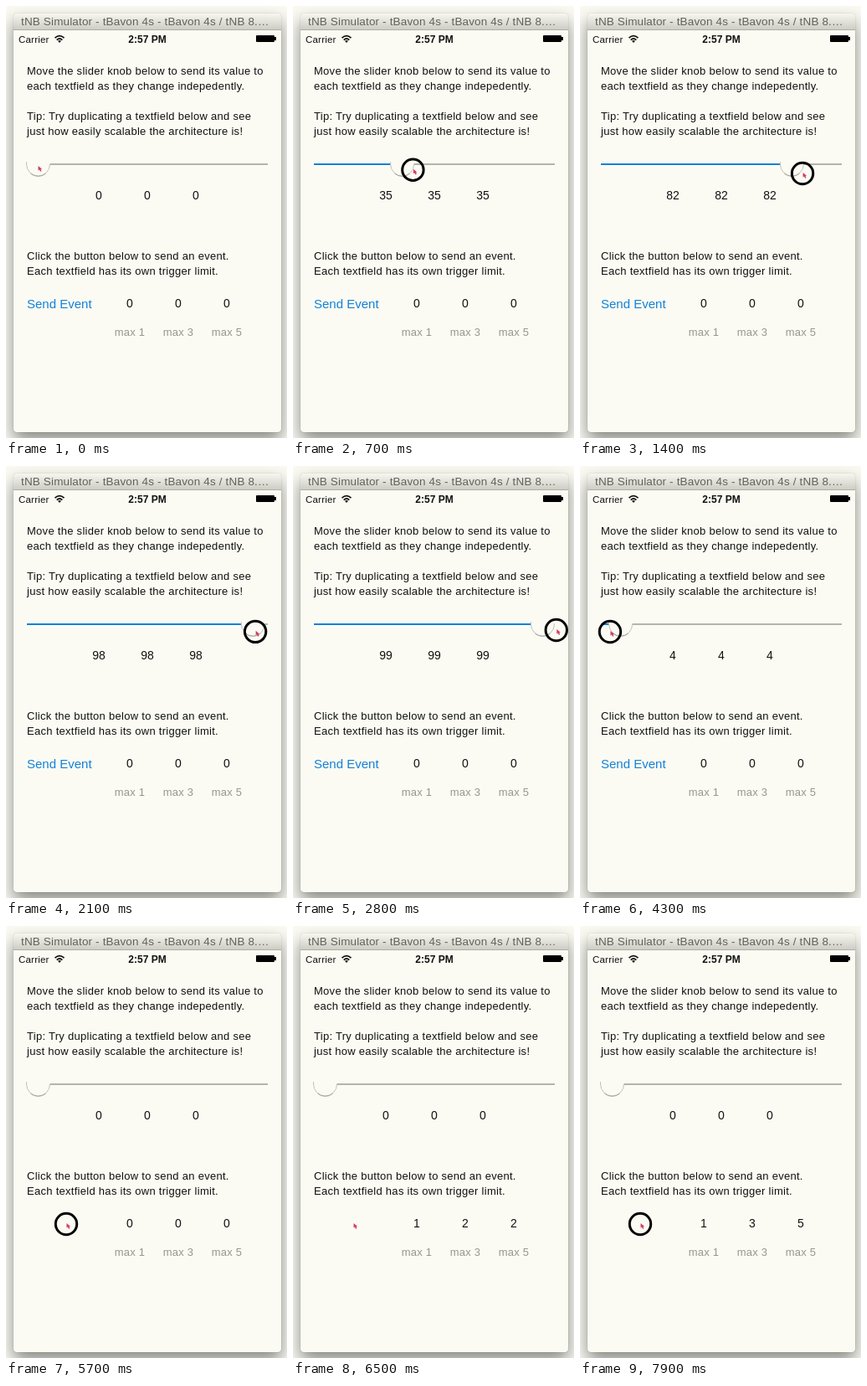
Recreate the animation shown at these times as an HTML page. Size 336 by 516 pixels, loop 8 s.

```html
<!DOCTYPE html>
<html lang="en">
<head>
<meta charset="utf-8">
<title>Slider and events</title>
<style>
  html, body { margin: 0; width: 100%; height: 100%; overflow: hidden; background: #fafaf3; }
  #stage { position: relative; width: 336px; height: 516px; overflow: hidden; }
  #window {
    position: absolute; left: 9px; top: 9px; width: 320px; height: 500px;
    border-radius: 4px; background: #fbfbf3;
    box-shadow: 0 10px 20px rgba(0, 0, 0, .45), 0 0 1px rgba(0, 0, 0, .4);
  }
  #bar {
    height: 19px; border-bottom: 1px solid #b0b0a9; border-radius: 4px 4px 0 0;
    background: linear-gradient(#f7f7f0, #cdcdc6);
  }
  svg { position: absolute; left: 0; top: 0; }
  text { font: 13px "Liberation Sans", Arial, sans-serif; fill: #111; white-space: pre; }
  .copy { letter-spacing: .28px; }
  .title { font-size: 13.5px; letter-spacing: .15px; fill: #62625d; }
  .status { font-size: 11.5px; letter-spacing: .2px; }
  .time { font-size: 12px; font-weight: bold; text-anchor: middle; }
  .num { font-size: 14px; text-anchor: middle; }
  .max { letter-spacing: .2px; text-anchor: middle; fill: #96968f; }
  #send { font-size: 15px; fill: #1280dc; }
</style>
</head>
<body>
<div id="stage">
  <div id="window"><div id="bar"></div></div>
  <svg id="ui" width="336" height="516">
    <text class="title" x="18" y="23">tNB Simulator - tBavon 4s - tBavon 4s / tNB 8.…</text>

    <text class="status" x="15" y="44">Carrier</text>
    <g fill="none" stroke="#111" stroke-width="1.7">
      <path d="M58.5 38.2Q64 33 69.5 38.2M60.7 40.6Q64 37.4 67.3 40.6"/>
      <path d="M62 41.8Q64 40 66 41.8L64 44Z" fill="#111" stroke="none"/>
    </g>
    <text class="time" x="169" y="44">2:57 PM</text>
    <rect x="299" y="35" width="22" height="8" rx="1"/>
    <rect x="321" y="37" width="2" height="4"/>

    <text class="copy" x="25" y="82">Move the slider knob below to send its value to</text>
    <text class="copy" x="25" y="100">each textfield as they change indepedently.</text>
    <text class="copy" x="25" y="136">Tip: Try duplicating a textfield below and see</text>
    <text class="copy" x="25" y="154">just how easily scalable the architecture is!</text>
    <text class="copy" x="25" y="303">Click the button below to send an event.</text>
    <text class="copy" x="25" y="321">Each textfield has its own trigger limit.</text>

    <rect x="25" y="188" width="288" height="2" fill="#b4b4ae"/>
    <rect id="fill" x="25" y="188" height="2" fill="#1280dc"/>
    <g id="knob">
      <circle r="14" fill="#fbfbf3"/>
      <path d="M-14 -3V0A14 14 0 0 0 14 0" fill="none" stroke="#c2c2bb"/>
      <path d="M-9 11.2A14.3 14.3 0 0 0 9 11.2" fill="none" stroke="#a4a49e"/>
    </g>

    <text id="send" x="25" y="361">Send Event</text>
    <g id="numbers"></g>

    <g id="pointer">
      <circle id="ring" r="12.7" fill="none" stroke="#000" stroke-width="3"/>
      <path d="M.5 -1V4.5L2 3.5L3 5.8L4.4 5.2L3.6 3L5 2.8Z" fill="#d23a68"/>
    </g>
  </svg>
</div>
<script>
const LOOP = 8000, LAG = 70, HOLD = 250;
const KNOB_MIN = 39, KNOB_MAX = 299, STEP = 2.62;
const LIMITS = [1, 3, 5];
const presses = [5600, 6200, 6630, 7050, 7470, 7880];
// pointer path: time, x, y
const path = [
  [0, 38, 192], [100, 38, 192], [1400, 266, 200], [1800, 288, 199], [2600, 315, 196],
  [2800, 315, 196], [3700, 150, 198], [4300, 36, 198], [4600, 18, 196],
  [4750, 18, 196], [5450, 72, 356], [LOOP, 72, 356]
];

const $ = id => document.getElementById(id);
const clamp = (v, lo, hi) => Math.min(hi, Math.max(lo, v));

function addText(cls, x, y, str) {
  const el = document.createElementNS("http://www.w3.org/2000/svg", "text");
  el.setAttribute("class", cls);
  el.setAttribute("x", x);
  el.setAttribute("y", y);
  el.textContent = str;
  $("numbers").append(el);
  return el;
}

const values = LIMITS.map((_, i) => addText("num", 111 + 58 * i, 231, 0));
const counts = LIMITS.map((_, i) => addText("num", 148 + 58 * i, 360, 0));
LIMITS.forEach((n, i) => addText("max", 148 + 58 * i, 394, "max " + n));

function pointerAt(t) {
  const i = Math.max(1, path.findIndex(p => p[0] >= t));
  const [t0, x0, y0] = path[i - 1], [t1, x1, y1] = path[i];
  const k = clamp((t - t0) / (t1 - t0), 0, 1);
  return [x0 + (x1 - x0) * k, y0 + (y1 - y0) * k];
}

function draw(t) {
  const dragging = t >= 100 && t < 4700;
  const [x, y] = pointerAt(t);
  const knob = clamp(pointerAt(Math.min(t, 4700) - LAG)[0], KNOB_MIN, KNOB_MAX);
  const value = Math.round((knob - KNOB_MIN) / STEP);
  $("knob").setAttribute("transform", `translate(${knob - .5} 189)`);
  $("fill").setAttribute("width", knob - KNOB_MIN);
  values.forEach(el => el.textContent = value);

  const last = presses.filter(p => p <= t).pop();
  const pressed = last !== undefined && t < last + HOLD;
  const clicks = presses.filter(p => p + HOLD <= t).length;
  counts.forEach((el, i) => el.textContent = Math.min(clicks, LIMITS[i]));
  // the label fades back in after each release
  $("send").style.opacity = last === undefined ? 1 : clamp((t - last - HOLD - 60) / 300, 0, 1);

  $("pointer").setAttribute("transform", `translate(${x} ${y})`);
  $("ring").style.display = dragging || pressed ? "" : "none";
}

const start = performance.now();
function frame() {
  draw((performance.now() - start) % LOOP);
  requestAnimationFrame(frame);
}
frame();
</script>
</body>
</html>
```
